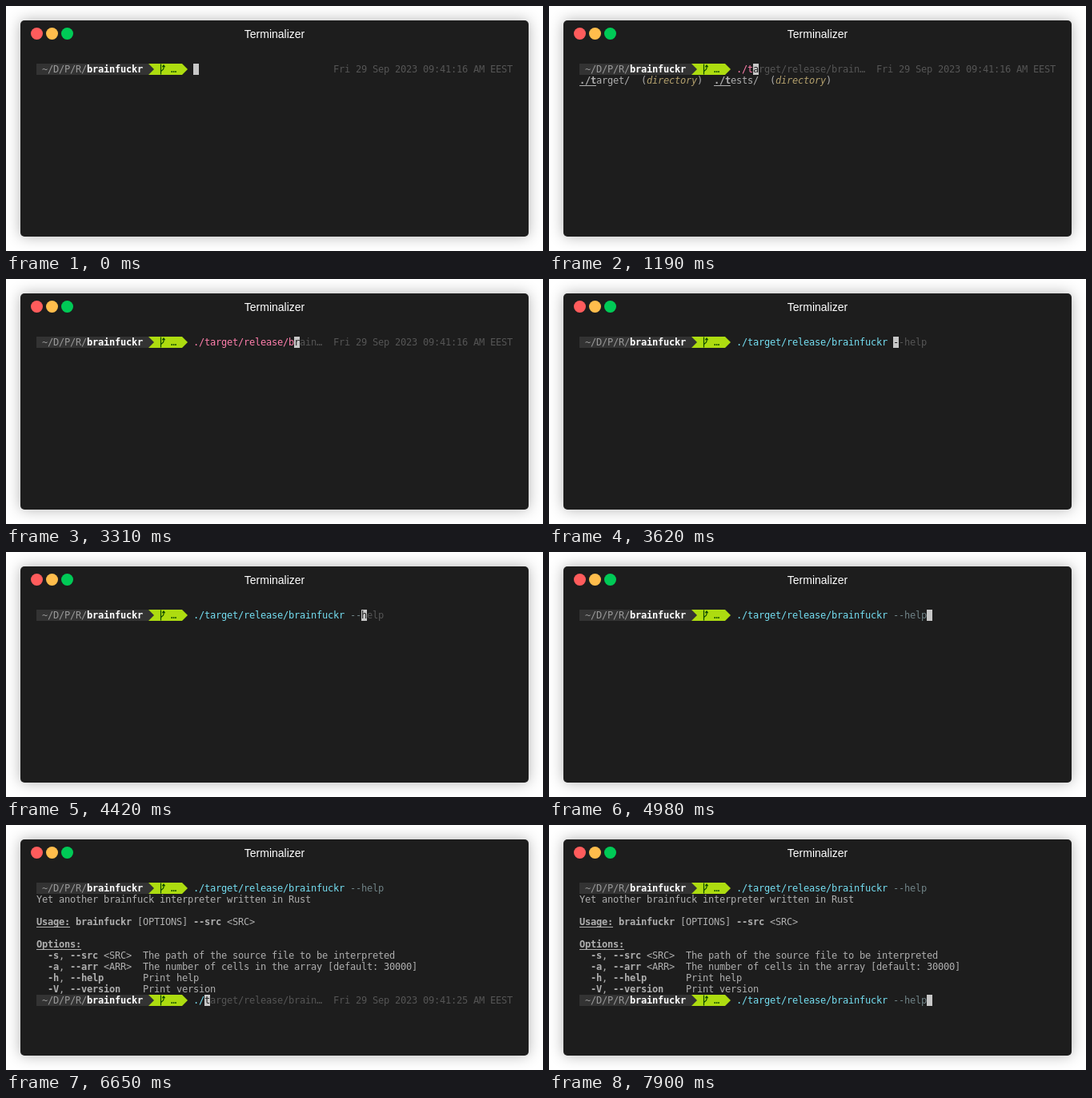
These frames come from a looping animation (671 by 306 pixels, 8000 ms). An HTML page:

```html
<!DOCTYPE html>
<html lang="en">
<head>
<meta charset="utf-8">
<title>Terminal</title>
<style>
  html, body { margin: 0; width: 100%; height: 100%; overflow: hidden; background: #fff; }
  .window {
    position: absolute; left: 18px; top: 18px; width: 635px; height: 270px;
    border-radius: 5px; background: #1d1d1d; box-shadow: 0 0 18px rgba(0, 0, 0, .3);
  }
  .dot { position: absolute; top: 9px; width: 15px; height: 15px; border-radius: 50%; }
  .close { left: 13px; background: #ff5c5c; }
  .minimize { left: 32px; background: #ffbd4c; }
  .zoom { left: 51px; background: #00ca56; }
  .title {
    position: absolute; top: 9px; width: 100%; text-align: center; color: #fff;
    font: 14px/16px "Liberation Sans", Arial, sans-serif;
  }
  #screen {
    position: absolute; left: 20px; top: 54px; color: #afafaf;
    font: 12px/14px "DejaVu Sans Mono", monospace; white-space: pre;
  }
  #screen > * { position: absolute; height: 14px; }
  .bold { font-weight: bold; }
  .mark { font-weight: bold; box-shadow: inset 0 -1px currentColor; }
  .note { color: #b3a06d; font-style: italic; }
  .ghost { color: #555; }
  .ok { color: #75dff2; }
  .bad { color: #ff7fac; }
  .param { color: #708387; }
  .path { background: #333; color: #999; }
  .path b { color: #fff; }
  .repo { background: #addc10; color: #0c4801; }
  .tip { width: 7px; clip-path: polygon(0 0, 100% 50%, 0 100%); }
  .branch { width: 7px; fill: none; stroke: #0c4801; stroke-width: 1.2; }
  .cursor { width: 7px; background: #c7c7c7; color: #1d1d1d; }
</style>
</head>
<body>
<div class="window">
  <i class="dot close"></i><i class="dot minimize"></i><i class="dot zoom"></i>
  <div class="title">Terminalizer</div>
  <div id="screen"></div>
</div>
<script>
const LOOP = 8000, CELL = 7, ROW = 14, INPUT = 28;
const BIN = "./target/release/brainfuckr", FULL = BIN + " --help";
const SHORT = "./target/release/brain…";
const screenBox = document.getElementById("screen");

// Keep every glyph on the terminal's cell grid.
const probe = document.createElement("span");
probe.textContent = "m".repeat(100);
screenBox.append(probe);
screenBox.style.letterSpacing = CELL - probe.getBoundingClientRect().width / 100 + "px";

const at = (col, row) => `style="left:${col * CELL}px;top:${row * ROW}px"`;
const safe = s => s.replace(/</g, "&lt;");
const put = (col, row, text, cls = "") => `<span class="${cls}" ${at(col, row)}>${safe(text)}</span>`;
const cursor = (col, row, char = " ") => put(col, row, char, "cursor");

// Lays out [text, class] runs one after another.
function line(row, ...runs) {
  let col = 0;
  return runs.map(([text, cls]) => {
    const html = put(col, row, text, cls);
    col += text.length;
    return html;
  }).join("");
}

const prompt = row =>
  `<span class="path" ${at(0, row)}> ~/D/P/R/<b>brainfuckr</b> </span>` +
  put(20, row, "    … ", "repo") +
  `<span class="path tip" ${at(20, row)}></span>` +
  `<span class="repo tip" ${at(26, row)}></span>` +
  `<svg class="branch" viewBox="0 0 7 14" ${at(22, row)}>` +
  `<path d="M1.5 .5V13.5M1.5 10.5C1.5 8 5 8.5 5 5.5V2M3.4 4.2L5 2L6.6 4.2"/></svg>`;

const date = (row, sec) => put(53, row, `Fri 29 Sep 2023 09:41:${sec} AM EEST`, "ghost");

// The prompt with n characters typed and the rest of the hint in grey.
function entry(row, n, cls, sec) {
  const wide = n > BIN.length;
  const hint = wide ? FULL : SHORT;
  return prompt(row) + (wide ? "" : date(row, sec)) +
    put(INPUT, row, FULL.slice(0, Math.min(n, BIN.length)), cls) +
    (wide ? put(INPUT + BIN.length, row, FULL.slice(BIN.length, n), "param") : "") +
    put(INPUT + n + 1, row, n ? hint.slice(n + 1) : "", "ghost") +
    cursor(INPUT + n, row, (n && hint[n]) || " ");
}

const choices = line(1,
  ["./t", "mark"], ["arget/  ("], ["directory", "note"], [")  "],
  ["./t", "mark"], ["ests/  ("], ["directory", "note"], [")"]);

const option = (row, flag, name, arg, about) =>
  line(row, ["  "], [flag, "bold"], [", "], [name, "bold"],
    [arg.padEnd(13 - name.length) + about]);

const ran = prompt(0) + put(INPUT, 0, BIN, "ok") + put(INPUT + BIN.length, 0, " --help", "param");
const help = ran +
  put(0, 1, "Yet another brainfuck interpreter written in Rust") +
  line(3, ["Usage:", "mark"], [" "], ["brainfuckr", "bold"], [" [OPTIONS] "], ["--src", "bold"], [" <SRC>"]) +
  put(0, 5, "Options:", "mark") +
  option(6, "-s", "--src", " <SRC>", "The path of the source file to be interpreted") +
  option(7, "-a", "--arr", " <ARR>", "The number of cells in the array [default: 30000]") +
  option(8, "-h", "--help", "", "Print help") +
  option(9, "-V", "--version", "", "Print version");

const first = (n, cls = "ok") => entry(0, n, cls, 16);
const second = n => help + entry(10, n, "ok", 25);

const steps = [
  [0, first(0)],
  [500, first(1)],
  [670, first(2)],
  [860, first(3, "bad")],
  [1190, first(3, "bad") + choices],
  [1850, first(4, "bad")],
  [1910, first(9)],
  [2510, first(10, "bad")],
  [2700, first(11, "bad")],
  [2770, first(17)],
  [3310, first(18, "bad")],
  [3490, first(19, "bad")],
  [3620, first(28)],
  [4290, first(29)],
  [4420, first(30)],
  [4590, first(31)],
  [4700, first(32)],
  [4810, first(33)],
  [4980, first(34)],
  [5230, ran + cursor(0, 1)],
  [5250, second(0)],
  [6490, second(1)],
  [6650, second(2)],
  [7900, second(34)]
];

let shown, start;
function draw(now) {
  start ??= now;
  const t = (now - start) % LOOP;
  const step = steps.findLast(s => s[0] <= t) || steps[0];
  if (step !== shown) screenBox.innerHTML = (shown = step)[1];
  requestAnimationFrame(draw);
}
screenBox.innerHTML = steps[0][1];
requestAnimationFrame(draw);
</script>
</body>
</html>
```
